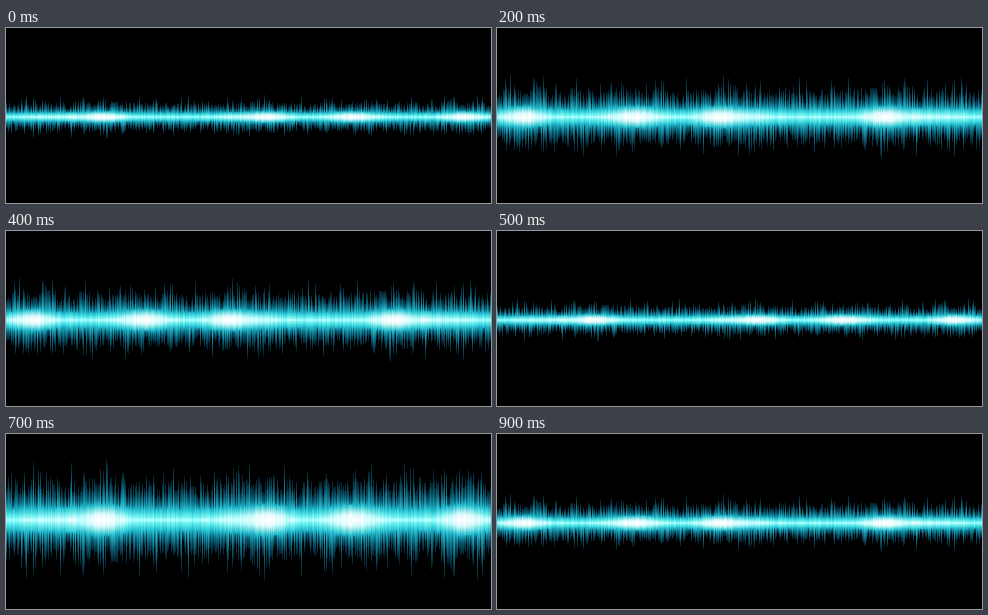
Recreate the animation shown at these times as an HTML page with a canvas. Size 485x175 px, loop 1000 ms.

```html
<!DOCTYPE html>
<html>
<head>
<meta charset="utf-8">
<title>Sound wave</title>
<style>
html, body { margin: 0; height: 100%; overflow: hidden; background: #000; }
canvas { display: block; }
</style>
</head>
<body>
<canvas id="stage" width="485" height="175"></canvas>
<script>
const W = 485, H = 175, R = 61;
const ctx = document.getElementById('stage').getContext('2d');
const wave = document.createElement('canvas');
wave.width = W;
wave.height = 2 * R;
const g = wave.getContext('2d');

let seed = 11;
const rnd = () => (seed = seed * 16807 % 2147483647) / 2147483647;

// [centre, half width, strength] of the bright swellings
const lumps = [[27, 20, 1], [137, 24, 1], [222, 21, 1], [387, 22, 1], [255, 20, .4], [435, 30, .3]];
const swell = x => Math.min(1, lumps.reduce(
  (sum, [c, w, k]) => sum + k * Math.exp(-(((x - c) / w) ** 2)), 0));

// one column on one side of the axis; stops are fractions of R
function spike(x, dir, glow, power) {
  const len = Math.min(1, .3 + .33 * rnd() + .08 * glow + .4 * rnd() ** 5);
  const grad = g.createLinearGradient(0, R, 0, R + dir * R);
  const white = .015 + .08 * glow;
  grad.addColorStop(0, `rgb(${150 + 105 * Math.max(glow, power)},255,255)`);
  grad.addColorStop(white, `rgb(${110 + 60 * power + 85 * glow},250,252)`);
  grad.addColorStop(white + .07, `rgb(${60 + 40 * power + 60 * glow},${215 + 25 * power},230)`);
  grad.addColorStop(white + .15, `rgb(${25 + 25 * power},${170 + 35 * power},${190 + 30 * power})`);
  grad.addColorStop(Math.max(len * .65, white + .17), `rgba(12,125,155,${.6 + .3 * power})`);
  grad.addColorStop(len, 'rgba(10,100,135,.3)');
  grad.addColorStop(len, 'rgba(10,100,135,0)');
  g.fillStyle = grad;
  g.fillRect(x, dir < 0 ? 0 : R, 1, R);
}

for (let x = 0; x < W; x++) {
  const glow = swell(x), power = rnd();
  spike(x, -1, glow, power);
  spike(x, 1, glow, power);
}

// [mirrored, height, upside down] for each tenth of the loop
const poses = [[1, 22], [0, 29], [0, 42], [0, 61, 1], [0, 42],
  [1, 22], [1, 42], [1, 61, 1], [1, 42], [0, 29]];

function draw(time) {
  const [mirror, height, flip] = poses[Math.floor(time % 1000 / 100)];
  ctx.setTransform(1, 0, 0, 1, 0, 0);
  ctx.fillStyle = '#000';
  ctx.fillRect(0, 0, W, H);
  ctx.translate(mirror ? W : 0, flip ? 86 : 89);
  ctx.scale(mirror ? -1 : 1, height / R * (flip ? -1 : 1));
  ctx.drawImage(wave, 0, -R);
}

let start;
function tick(now) {
  start ??= now;
  draw(now - start);
  requestAnimationFrame(tick);
}
draw(0);
requestAnimationFrame(tick);
</script>
</body>
</html>
```
